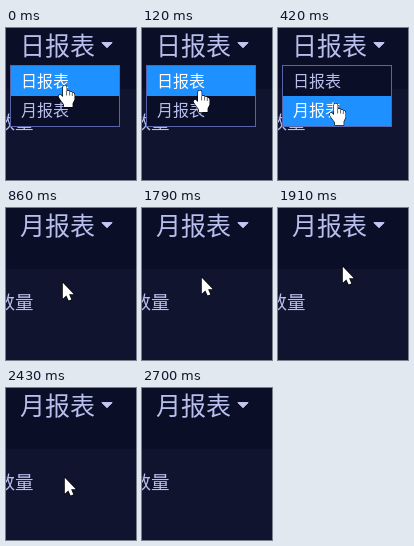
Write an HTML page that moves like this. It is 130x152 px and loops after 3070 ms.

```html
<!DOCTYPE html>
<html lang="zh-CN">
<head>
<meta charset="utf-8">
<style>
html, body { margin: 0; width: 100%; height: 100%; overflow: hidden; background: #10142f; }
svg { display: block; width: 130px; height: 152px; }
text { font-family: "Noto Sans CJK SC", "Noto Sans CJK", sans-serif; font-weight: 300; fill: #b9bfec; }
</style>
</head>
<body>
<svg viewBox="0 0 130 152" width="130" height="152">
  <rect width="130" height="152" fill="#10142f"/>
  <rect width="130" height="61" fill="#0b0e27"/>
  <text id="title" x="14" y="26.5" font-size="25"></text>
  <path d="M95.8 14.6H106.2L101 19.7Z" fill="#c3c9f3" stroke="#c3c9f3" stroke-linejoin="round"/>
  <text x="-9.5" y="101" font-size="18.5">数量</text>
  <g id="menu">
    <rect x="4.5" y="37.5" width="109" height="61" fill="#0b0e27" stroke="#5963a8"/>
    <rect id="active" x="5" width="108" height="30" fill="#1e90ff"/>
    <text class="item" x="15" y="59" font-size="16">日报表</text>
    <text class="item" x="15" y="88" font-size="16">月报表</text>
  </g>
  <g id="hand" stroke="#000" stroke-linejoin="round">
    <path fill="#fff" stroke-width="1.2" paint-order="stroke" d="M6.8 .6Q8.6 .6 8.6 2.2V6Q11 5.2 11.6 6.8Q13.6 6.2 14.3 7.8Q16.5 7.6 16.5 9.8V14.5L14.6 18.5V22H6V19.5L2.6 15L.6 11.8Q.5 9.7 2.6 9.8L5 12V2.2Q5 .6 6.8 .6Z"/>
    <path fill="none" stroke-width=".6" d="M8.6 6V10.5M11.6 7V10.5M14.3 8V11"/>
  </g>
  <path id="arrow" fill="#fff" stroke="#000" stroke-width="1.2" paint-order="stroke" d="M.8 .8V16.8L4.3 13.4L6.6 18.6L9.4 17.4L7.1 12.3H11.8Z"/>
</svg>
<script>
const LOOP = 3070, PICK = 270, CLOSE = 860;
// start time, cursor shape, left, top
const moves = [
  [0, "hand", 52, 57],
  [120, "hand", 51, 62],
  [270, "hand", 50, 71],
  [420, "hand", 51, 75],
  [860, "arrow", 56, 74],
  [1790, "arrow", 59, 69],
  [1910, "arrow", 64, 58],
  [2030, "hand", 64.5, 46],
  [2150, "hand", 70, 34],
  [2430, "arrow", 58, 89],
  [2580, "arrow", 54, 131],
  [2700, "none", 0, 0]
];
const $ = id => document.getElementById(id);
const items = document.querySelectorAll(".item");
const show = (el, on) => el.setAttribute("visibility", on ? "visible" : "hidden");

function render(t) {
  const [, shape, x, y] = moves.filter(m => m[0] <= t).pop();
  for (const id of ["hand", "arrow"]) {
    show($(id), id === shape);
    $(id).setAttribute("transform", `translate(${x} ${y})`);
  }
  const picked = t < PICK ? 0 : 1;
  $("title").textContent = t < CLOSE ? "日报表" : "月报表";
  show($("menu"), t < CLOSE);
  $("active").setAttribute("y", 38 + 30 * picked);
  items.forEach((el, i) => { el.style.fill = i === picked ? "#fff" : "#b9bfec"; });
}

const start = performance.now();
function tick() {
  render((performance.now() - start) % LOOP);
  requestAnimationFrame(tick);
}
render(0);
requestAnimationFrame(tick);
</script>
</body>
</html>
```
